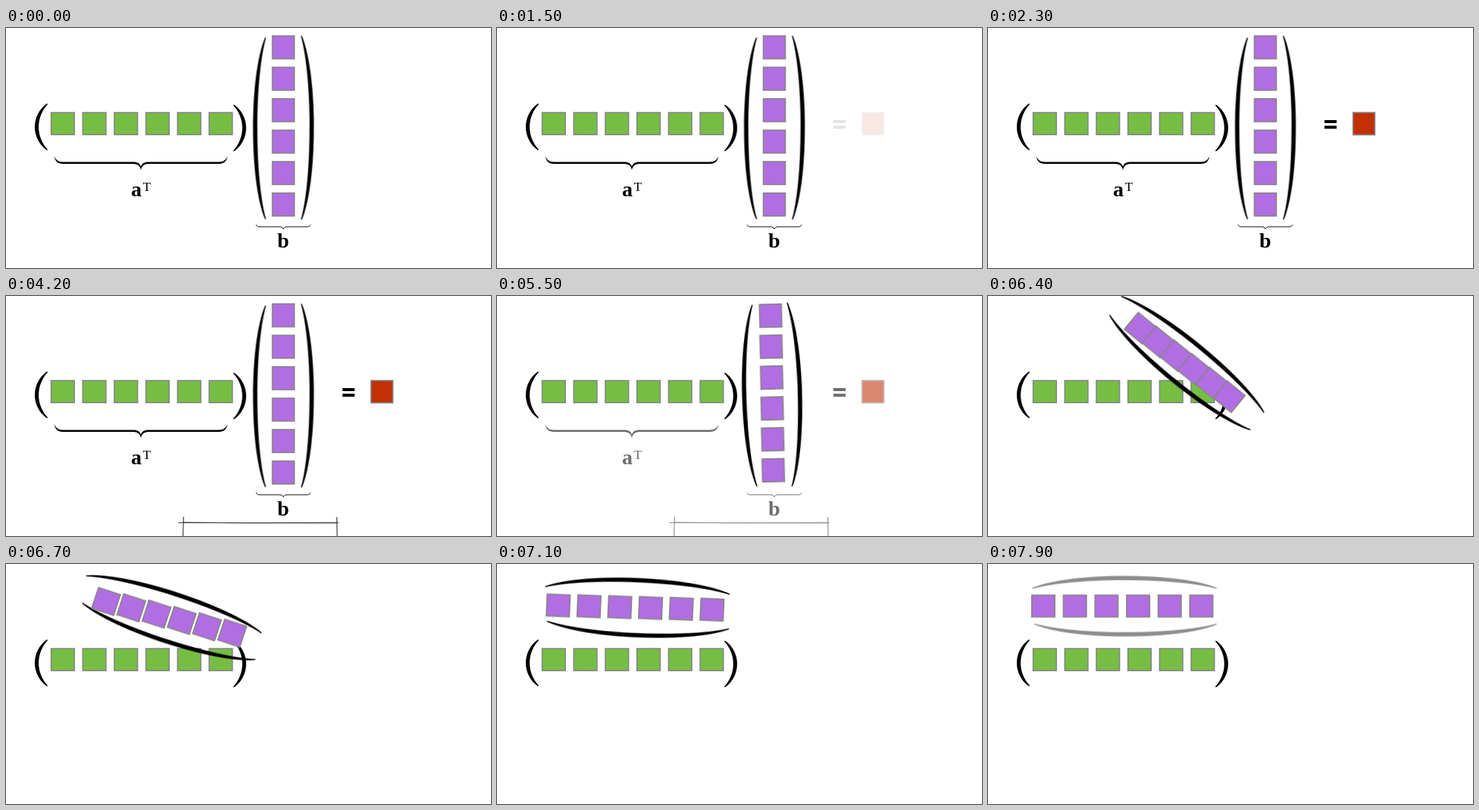
These frames come from a looping animation (640 by 318 pixels, 8 s). An HTML page:

```html
<!DOCTYPE html>
<html lang="en">
<head>
<meta charset="utf-8">
<title>Inner product</title>
<style>
  html, body { margin: 0; width: 100%; height: 100%; overflow: hidden; background: #fff; }
  svg { display: block; width: 640px; height: 318px; }
  text { font-family: "Liberation Serif", "Times New Roman", serif; }
  .bold { font-size: 28px; font-weight: bold; }
  .sup { font-size: 17.5px; }
  .box { stroke: #858585; stroke-width: 1.6; }
  .a { fill: #76be43; }
  .b { fill: #b16ee2; }
  .c { fill: #c23005; }

  .result, .table, .extras, .turn, .fade { animation: 8s linear infinite; }
  .result { animation-name: result; }
  .table { animation-name: table; }
  .extras { animation-name: extras; }
  .fade { animation-name: fade; }
  .turn { animation-name: turn; }

  .cell {
    --x0: 366px; --y0: calc(25.6px + var(--i) * 41.65px);
    --x1: calc(73px + var(--i) * 41.7px); --y1: 55.7px;
  }
  .open { --x0: 334.5px; --y0: 133px; --x1: 181.5px; --y1: 87.5px; }
  .close { --x0: 397.7px; --y0: 132px; --x1: 180px; --y1: 24.3px; }

  @keyframes result { 0%, 17.5% { opacity: 0; } 28.75%, 100% { opacity: 1; } }
  @keyframes table { 0%, 42.5% { opacity: 0; } 52.5%, 100% { opacity: 1; } }
  @keyframes extras {
    0%, 66.25% { opacity: 1; animation-timing-function: cubic-bezier(.25, .46, .45, .94); }
    77%, 100% { opacity: 0; }
  }
  @keyframes turn {
    0%, 66.25% {
      transform: translate(var(--x0), var(--y0)) rotate(0deg);
      animation-timing-function: cubic-bezier(.45, 0, .555, 1);
    }
    91.875%, 100% { transform: translate(var(--x1), var(--y1)) rotate(-90deg); }
  }
  @keyframes fade { 0%, 93.75% { opacity: 1; } 98.75%, 100% { opacity: .45; } }
</style>
</head>
<body>
<svg viewBox="0 0 640 318">
  <defs>
    <rect id="wide" x="-15.3" y="-14.6" width="30.6" height="29.2"/>
    <rect id="tall" x="-14.5" y="-15.2" width="29" height="30.4"/>
    <path id="small" d="M7.6-31 C-13.8-16 -13.8 16 7.6 31 L8.6 30 C-7-13 -7 13 8.6-30Z
      M7.6-31 L8.6-30 C-7-13 -7 13 8.6 30 L7.6 31 C-13.8 16 -13.8-16 7.6-31Z"/>
    <path id="smallParen" d="M7.6-31 C-13.8-16 -13.8 16 7.6 31 L8.6 30 C-7.3 13 -7.3-13 8.6-30Z"/>
    <path id="tallParen" d="M7.4-120.5 C-13.8-70 -13.8 70 7.4 120.5 L8.6 120 C-6.6 66 -6.6-66 8.6-120Z"/>
    <path id="halfBrace" d="M0 188.5 C1 182 5 180 11 180 H103 C110 180 113.5 176 114.2 170
      C112 175 109 177.4 103 177.4 H10 C4 177.4 .5 180 0 184Z"/>
  </defs>

  <g class="extras">
    <use href="#halfBrace" x="178"/>
    <use href="#halfBrace" transform="translate(178) scale(-1 1)"/>
    <text class="bold" x="165" y="222.5">a</text>
    <text class="sup" x="180.5" y="216">T</text>

    <path d="M330 260.5 Q330.5 263.4 334 263.4 H361 Q365.5 263.4 366 266.3
      Q366.5 263.4 371 263.4 H398 Q401.5 263.4 402 260.5" fill="none" stroke="#222"/>
    <text class="bold" x="358" y="290.5">b</text>

    <g class="result">
      <path d="M444 122h16v4h-16z M444 129.5h16v4h-16z"/>
      <rect class="box c" x="481.7" y="112" width="28.8" height="29.6"/>
    </g>

    <g class="table" fill="none" stroke="#333">
      <path d="M227 300.4 L330 300.6 L439 300.1 M233 299.9 L300 300.7 L437 300.9" stroke-width=".9"/>
      <path d="M234.3 292.5 L233.6 318 M436.6 293 L437 318" stroke-width="1.1"/>
    </g>
  </g>

  <use href="#smallParen" x="46.5" y="131"/>
  <use href="#smallParen" transform="translate(308.5 132.6) scale(-1 1)"/>
  <g class="box a">
    <use href="#wide" x="74.9" y="126.7"/>
    <use href="#wide" x="116.6" y="126.7"/>
    <use href="#wide" x="158.3" y="126.7"/>
    <use href="#wide" x="200" y="126.7"/>
    <use href="#wide" x="241.7" y="126.7"/>
    <use href="#wide" x="283.4" y="126.7"/>
  </g>

  <g class="fade">
    <g class="turn open"><use href="#tallParen"/></g>
    <g class="turn close"><use href="#tallParen" transform="scale(-1 1.012)"/></g>
  </g>
  <g class="box b">
    <g class="turn cell" style="--i:0"><use href="#tall"/></g>
    <g class="turn cell" style="--i:1"><use href="#tall"/></g>
    <g class="turn cell" style="--i:2"><use href="#tall"/></g>
    <g class="turn cell" style="--i:3"><use href="#tall"/></g>
    <g class="turn cell" style="--i:4"><use href="#tall"/></g>
    <g class="turn cell" style="--i:5"><use href="#tall"/></g>
  </g>
</svg>
</body>
</html>
```
